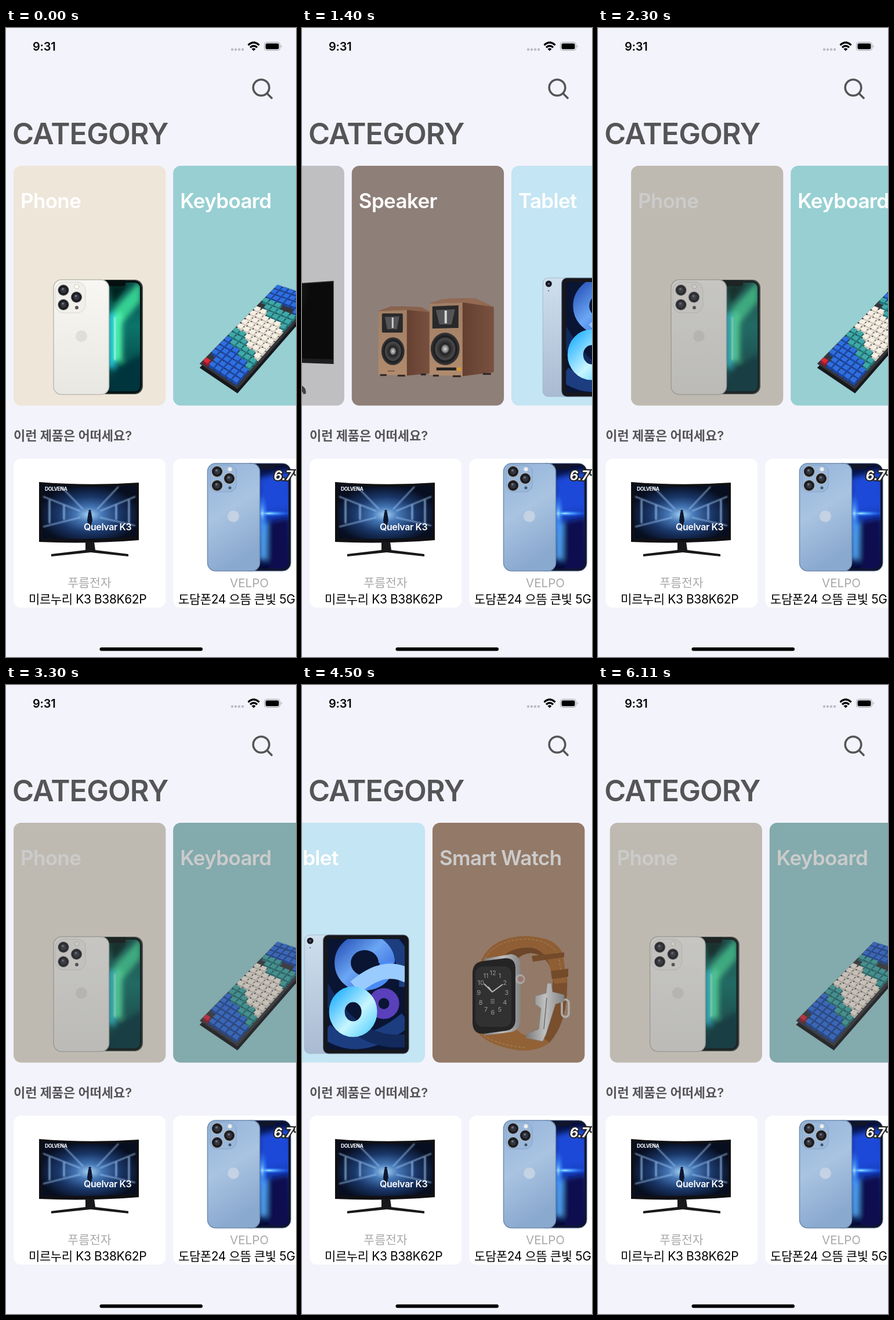
Recreate the animation shown at these times as an HTML page. Size 500x1082 px, loop 6.22 s.

```html
<!DOCTYPE html>
<html lang="ko">
<head>
<meta charset="utf-8">
<title>Category</title>
<style>
  html, body { margin: 0; height: 100%; overflow: hidden; background: #f3f3fb; }
  svg { display: block; width: 100vw; height: 100vh; }
  text { font-family: Inter, 'Noto Sans CJK KR', 'Noto Sans CJK', sans-serif; }
  .title { font-size: 35px; font-weight: 600; letter-spacing: -.65px; fill: #fff; }
  .maker { font-size: 20.5px; fill: #a9a9ab; text-anchor: middle; }
  .item { font-size: 21px; letter-spacing: -.4px; }
</style>
</head>
<body>
<svg viewBox="0 0 500 1082">
  <defs>
    <filter id="soft" x="-50%" y="-50%" width="200%" height="200%"><feGaussianBlur stdDeviation="5"/></filter>
    <filter id="haze" x="-50%" y="-50%" width="200%" height="200%"><feGaussianBlur stdDeviation="1"/></filter>
    <linearGradient id="white" x2="0" y2="1"><stop stop-color="#f8f7f3"/><stop offset="1" stop-color="#e8e7e2"/></linearGradient>
    <linearGradient id="teal" x2="0" y2="1"><stop stop-color="#0b4a48"/><stop offset=".4" stop-color="#0c746a"/><stop offset=".75" stop-color="#06504f"/><stop offset="1" stop-color="#03262e"/></linearGradient>
    <radialGradient id="gloss" cx=".1" cy=".1" r=".7"><stop stop-color="#777"/><stop offset=".35" stop-color="#3a3a3a"/><stop offset="1" stop-color="#0b0b0b"/></radialGradient>
    <linearGradient id="front" x2="0" y2="1"><stop stop-color="#a17e64"/><stop offset="1" stop-color="#b18b6d"/></linearGradient>
    <linearGradient id="side"><stop stop-color="#70493a"/><stop offset=".5" stop-color="#633f30"/><stop offset="1" stop-color="#7a5140"/></linearGradient>
    <radialGradient id="cone"><stop stop-color="#ddd"/><stop offset=".22" stop-color="#777"/><stop offset=".3" stop-color="#222"/><stop offset=".65" stop-color="#4a4a4c"/><stop offset=".75" stop-color="#1b1b1d"/><stop offset="1" stop-color="#39393c"/></radialGradient>
    <linearGradient id="back" x2="0" y2="1"><stop stop-color="#cfdfee"/><stop offset="1" stop-color="#a9bbd2"/></linearGradient>
    <linearGradient id="loop" x2="1" y2="1"><stop stop-color="#2f5cc0"/><stop offset=".45" stop-color="#6ba6f4"/><stop offset="1" stop-color="#3467dc"/></linearGradient>
    <linearGradient id="ring" x2="1" y2="1"><stop stop-color="#35b8ff"/><stop offset=".6" stop-color="#c8f6ff"/><stop offset="1" stop-color="#6fd8ff"/></linearGradient>
    <linearGradient id="steel"><stop stop-color="#888"/><stop offset=".5" stop-color="#eee"/><stop offset="1" stop-color="#999"/></linearGradient>
    <radialGradient id="hall" cx=".5" cy=".55" r=".55"><stop stop-color="#a9d4f7"/><stop offset=".25" stop-color="#4577b5"/><stop offset=".6" stop-color="#1a3769"/><stop offset="1" stop-color="#070e20"/></radialGradient>
    <linearGradient id="sky" x2=".3" y2="1"><stop stop-color="#93b4da"/><stop offset=".5" stop-color="#a9c3e1"/><stop offset="1" stop-color="#8aa9cf"/></linearGradient>
    <linearGradient id="navy" x2="0" y2="1"><stop stop-color="#050d38"/><stop offset=".45" stop-color="#1744c6"/><stop offset="1" stop-color="#050b34"/></linearGradient>
    <radialGradient id="glow"><stop stop-color="#c9f2ff"/><stop offset=".3" stop-color="#4fa5ff"/><stop offset="1" stop-color="#2a6cff" stop-opacity="0"/></radialGradient>
    <clipPath id="pane"><rect x="44" y="437" width="133" height="190" rx="3"/></clipPath>
    <clipPath id="greenPane"><rect x="140" y="438" width="91" height="187" rx="9"/></clipPath>
    <clipPath id="bluePane"><rect x="410" y="753" width="77" height="177" rx="10"/></clipPath>

    <g id="lens"><circle r="10" fill="#b4b4b2"/><circle r="9" fill="#1c1d22"/><circle r="5" fill="#34363f"/><circle cx="-1" cy="-2" r="2" fill="#6a7080"/></g>

    <g id="art0" transform="translate(-13)">
      <rect x="130" y="433" width="106" height="197" rx="14" fill="#3e4a48"/>
      <rect x="132" y="434.500" width="102" height="194" rx="13" fill="#06100f"/>
      <g clip-path="url(#greenPane)">
        <rect x="140" y="438" width="91" height="187" fill="url(#teal)"/>
        <g filter="url(#soft)">
          <path d="M176 440H212L186 476Z" fill="#04211f"/>
          <path d="M184 486L232 434V470L190 520Z" fill="#35cf92"/>
          <path d="M188 490H200V574H188Z" fill="#4ff5a6"/>
          <path d="M176 490H188V585H176Z" fill="#20c6dc"/>
          <path d="M190 585L235 560V630H176Z" fill="#04343c"/>
        </g>
        <rect x="186.500" y="497" width="2.500" height="74" fill="#a5ffd0" filter="url(#haze)"/>
      </g>
      <path d="M170 434H206V440Q206 444 202 444H170Z" fill="#06100f"/>
      <rect x="82" y="433" width="95.500" height="197.500" rx="14" fill="url(#white)" stroke="#bcbab2" stroke-width="1.500"/>
      <rect x="85" y="437" width="52" height="53" rx="14" fill="#f1f0eb" stroke="#d8d6cf"/>
      <use href="#lens" x="99" y="451"/><use href="#lens" x="121.500" y="463"/><use href="#lens" x="99" y="476"/>
      <circle cx="122" cy="445" r="4" fill="#fffdf2" stroke="#ccc"/><circle cx="122" cy="481" r="3" fill="#55555a"/>
      <circle cx="130" cy="530" r="10" fill="#dfded9"/>
    </g>

    <g id="art1"></g>

    <g id="art2" transform="translate(-151)">
      <path d="M215 613Q265 604 330 612Q349 615 347 629L343 630Q341 621 322 619Q270 613 217 618Z" fill="#414143"/>
      <path d="M295 572H311V610L303 613L295 610Z" fill="#2b2b2d"/><path d="M300 576H303V611H300Z" fill="#555"/>
      <path d="M197 449L395 435V578L197 571Z" fill="#1e1e20"/>
      <path d="M198.500 450.500L394 437V570L198.500 564Z" fill="url(#gloss)"/>
      <circle cx="285" cy="570.500" r="1.500" fill="#aaa"/>
    </g>

    <g id="art3" transform="translate(-86)">
      <path d="M132 487L154 479L205 480L222 489V594L181 598Z" fill="url(#side)"/>
      <path d="M132 487L154 479L205 480L222 489L181 485Z" fill="#8a634d"/>
      <path d="M132 487L181 485V598L132 596Z" fill="url(#front)"/>
      <rect x="138" y="491" width="36" height="33" rx="2" fill="#29292b"/><path d="M143 497L168 496L164 518H147Z" fill="#555558"/><path d="M155 498H158V516H155Z" fill="#ccc"/>
      <ellipse cx="157" cy="556" rx="20" ry="24" fill="url(#cone)"/>
      <path d="M148 590H160" stroke="#6b4b38" stroke-width="1.500"/>
      <path d="M220 474L245 466L298 465L331 480V592L277 599Z" fill="url(#side)"/>
      <path d="M220 474L245 466L298 465L331 480L277 472Z" fill="#936a54"/>
      <path d="M220 474L277 472V599L220 597Z" fill="url(#front)"/>
      <path d="M225 479L270 477V516L225 517Z" fill="#29292b"/><path d="M231 485L264 484L258 510H237Z" fill="#555558"/><path d="M246 486H250V508H246Z" fill="#d5d5d5"/>
      <ellipse cx="247" cy="552" rx="25" ry="28" fill="url(#cone)"/>
      <path d="M232 584H266V589H232Z" fill="#222"/><circle cx="271" cy="587" r="3.500" fill="#d79b2f"/>
      <path d="M135 597H146M165 598H178M205 596H214M226 598H236M260 599H274M312 595H326" stroke="#2b2220" stroke-width="3"/>
    </g>

    <g id="art4" transform="translate(50.300)">
      <rect x="4" y="430" width="60" height="204" rx="9" fill="url(#back)" stroke="#9fb1c6" stroke-width=".8"/>
      <circle cx="14" cy="440" r="5.500" fill="#15171d"/><circle cx="14" cy="440" r="2" fill="#46506a"/><circle cx="14" cy="452" r="1" fill="#555"/>
      <rect x="36.500" y="430" width="147.500" height="204" rx="9" fill="#15171c" stroke="#59657a"/>
      <g clip-path="url(#pane)" fill="none">
        <path d="M44 437H177V627H44Z" fill="#0a1533"/>
        <path d="M130 425Q185 455 180 520M40 595Q100 640 180 575" stroke="#1c3d80" stroke-width="26"/>
        <path d="M36 520Q90 620 178 612" stroke="#122a5c" stroke-width="22"/>
        <circle cx="141" cy="548" r="18" stroke="#5a40bb" stroke-width="17"/>
        <path d="M146 478A38 36 0 1 0 108 514" stroke="url(#loop)" stroke-width="28"/>
        <path d="M146 476Q146 512 105 514" stroke="#4a8bf5" stroke-width="24"/>
        <path d="M182 500Q140 478 92 520" stroke="#9acbff" stroke-width="26"/>
        <ellipse cx="88" cy="562" rx="28" ry="30" stroke="url(#ring)" stroke-width="27"/>
      </g>
    </g>

    <g id="art5" transform="translate(-225)">
      <path d="M433 500L457 504Q460 580 426 616L403 604Q430 566 433 500Z" fill="#8a4d1e"/>
      <path d="M307 478Q325 433 385 432Q440 433 450 464L457 512L435 514L427 484Q418 463 394 461Q372 464 366 480Z" fill="#a96326"/>
      <path d="M340 476Q356 450 394 452Q418 454 427 484Q418 463 394 461Q372 464 366 480Z" fill="#764018"/>
      <path d="M316 470Q334 439 385 437Q430 438 442 466L450 508" fill="none" stroke="#cf9f68" stroke-width="1" stroke-dasharray="4 3"/>
      <path d="M396 466L452 460V468L398 476ZM429 492L459 488V502L431 506Z" fill="#80481a"/>
      <path d="M300 592Q312 618 370 628Q405 632 427 615L410 603Q378 608 368 588Z" fill="#ad6829"/>
      <path d="M308 599Q330 618 385 624" fill="none" stroke="#d3a56f" stroke-width="1" stroke-dasharray="4 3"/>
      <rect x="448" y="541" width="12" height="30" rx="6" fill="none" stroke="#d5d5d5" stroke-width="3.500"/>
      <path d="M423 513H430L432 528L452 533V544L437 549L421 600L415 613L386 607L388 600L408 592L412 556L402 549V535L421 530Z" fill="url(#steel)" stroke="#8a8a8a" stroke-width=".7"/>
      <path d="M422 538L417 592" stroke="#777" stroke-width="1.500"/>
      <path d="M314 471L360 463Q376 464 377 484V576Q376 594 360 597L314 603Z" fill="url(#steel)"/>
      <circle cx="376" cy="506" r="8.500" fill="#c9c9c9"/><circle cx="377" cy="506" r="5" fill="#b9887c"/>
      <path d="M312 475L350 470Q367 469 368 486V577Q367 593 350 595L312 600Q295 600 294 582V494Q295 477 312 475Z" fill="#101011"/>
      <rect x="299" y="484" width="62" height="104" rx="13" fill="#222224"/>
      <g id="dial" font-size="11" fill="#b8b8b8" text-anchor="middle"></g>
      <path d="M314 514L328 528L346 515M328 528L321 519" stroke="#e5e5e5" stroke-width="1.800" fill="none"/>
      <path d="M325 541H332M325 544H332M325 547H332" stroke="#888" stroke-width="1.500"/>
    </g>
  </defs>

  <rect width="500" height="1082" fill="#f3f3fb"/>
  <text x="46" y="39" font-size="20" font-weight="600" letter-spacing="-.2">9:31</text>
  <g fill="#bcbcc3"><circle cx="390" cy="37" r="2.200"/><circle cx="396" cy="37" r="2.200"/><circle cx="402" cy="37" r="2.200"/><circle cx="408" cy="37" r="2.200"/></g>
  <g fill="none" stroke="#000" stroke-width="3.200"><path d="M417.500 29.500Q427 20.500 436.500 29.500M421 33.500Q427 28 433 33.500"/></g>
  <path d="M427 39.500L423.500 36Q427 33 430.500 36Z"/>
  <rect x="445.500" y="24.500" width="27" height="14" rx="4" fill="none" stroke="#a0a0a6"/><rect x="447.500" y="26.500" width="23" height="10" rx="2.500"/><path d="M474.500 29Q477 31.500 474.500 34Z" fill="#a0a0a6"/>
  <g fill="none" stroke="#555558" stroke-width="3.600" stroke-linecap="round"><circle cx="440" cy="102.500" r="13.800"/><path d="M450.500 113L458 120.500"/></g>
  <text x="11" y="200" font-size="50.500" font-weight="600" letter-spacing="-1" fill="#555558">CATEGORY</text>

  <g id="row"></g>

  <text x="13" y="709" font-size="22" font-weight="600" letter-spacing="-.1" fill="#555558">이런 제품은 어떠세요?</text>
  <rect x="13" y="741" width="262.300" height="256" rx="13" fill="#fff"/>
  <rect x="288.200" y="741" width="262.300" height="256" rx="13" fill="#fff"/>

  <path d="M57 781Q143 788 229 782V881Q143 888 57 884Z" fill="#101014"/>
  <path d="M62 786Q143 792 225 787V875Q143 881 62 878Z" fill="url(#hall)"/>
  <g stroke="#a9d2ff" opacity=".7" fill="none" filter="url(#haze)">
    <path d="M64 806L128 831M223 806L162 831M64 858L128 842M223 856L162 842M95 789L133 828M194 789L157 828" stroke-width="2"/>
    <path d="M75 812V852M100 820V846M190 820V846M212 812V852" stroke-width="3"/>
  </g>
  <path d="M142 833H147L149 847L146 859H142L140 847Z" fill="#0b1830"/><circle cx="144.500" cy="831" r="2.200" fill="#0b1830"/>
  <text x="67" y="796" font-size="8.500" font-weight="700" fill="#fff" letter-spacing="-.4">DOLVENA</text>
  <text x="134" y="864" font-size="16" font-weight="600" fill="#fff" letter-spacing="-.4">Quelvar K3</text>
  <path d="M137 884H152L154 898L211 905V909L146 902L78 909V905L137 898Z" fill="#18181b"/>
  <text class="maker" x="144" y="962">푸름전자</text>
  <text class="item" x="39" y="990">미르누리 K3 B38K62P</text>

  <rect x="405" y="749" width="86" height="185" rx="14" fill="#10152c" stroke="#536a96"/>
  <g clip-path="url(#bluePane)">
    <rect x="410" y="753" width="77" height="177" fill="url(#navy)"/>
    <g filter="url(#soft)">
      <path d="M436 775L490 760V826L440 834Z" fill="#1b49d8"/>
      <path d="M452 850L490 842V935H452Z" fill="#071050"/>
      <path d="M438 850H449V915H438Z" fill="#58b4ff"/>
    </g>
    <ellipse cx="452" cy="835" rx="40" ry="5" fill="url(#glow)"/><ellipse cx="442" cy="835" rx="10" ry="36" fill="url(#glow)" opacity=".7"/>
  </g>
  <path d="M430 750H464V755Q464 759 460 759H430Z" fill="#10152c"/>
  <rect x="347.500" y="749" width="90" height="185" rx="14" fill="url(#sky)" stroke="#6f8cb0" stroke-width="1.500"/>
  <rect x="352" y="752" width="45" height="46" rx="12" fill="#9ab8da" stroke="#83a2c8"/>
  <use href="#lens" x="364" y="763"/><use href="#lens" x="385" y="775"/><use href="#lens" x="364" y="787"/>
  <circle cx="386" cy="759" r="3.500" fill="#eee"/><circle cx="386" cy="791" r="2.500" fill="#456"/>
  <circle cx="392" cy="840" r="10" fill="#c4d2e4"/>
  <text x="461.500" y="778" font-size="23" font-weight="700" font-style="italic" letter-spacing="-.6" fill="#fff" stroke="#222" stroke-width="4" paint-order="stroke" stroke-linejoin="round">6.7"</text>
  <text class="maker" x="419.500" y="962">VELPO</text>
  <text class="item" x="297" y="990">도담폰24 으뜸 큰빛 5G</text>

  <rect x="161.500" y="1065.500" width="177.500" height="6" rx="3"/>
</svg>
<script>
const $ = id => document.getElementById(id);
const PITCH = 275.2, END = 1164, LOOP = 6220;

// name, colour, time of the touch that dims the card
const cards = [
  ['Phone', '#eee6d9', 900], ['Keyboard', '#97cfd3', 3200], ['Monitor', '#bfbfc1'],
  ['Speaker', '#8e7f78'], ['Tablet', '#c4e5f3'], ['Smart Watch', '#ae8a70', 4400]
];

// start, end, scroll from, scroll to
const moves = [
  [850, 1768, 0, END], [1768, 2300, END, -44], [2300, 2800, -44, 0],
  [3300, 4300, 0, END], [4500, 5874, END, -44], [5874, 6195, -44, 0]
];

// Keyboard plane: u runs along the rows, v across them
const mix = (a, b, k) => a + (b - a) * k;
const plane = (u, v) => [
  mix(mix(50, 180, u), mix(110, 244, u), v),
  mix(mix(572, 440, u), mix(612, 460, u), v)
];
const quad = (u0, v0, u1, v1, dy, fill) => {
  const points = [[u0, v0], [u1, v0], [u1, v1], [u0, v1]].map(([u, v]) => {
    const [x, y] = plane(u, v);
    return x.toFixed(1) + ',' + (y + dy).toFixed(1);
  });
  return `<polygon points="${points.join(' ')}" fill="${fill}"/>`;
};
const BLUE = ['#2f6fe0', '#1a46a4'], TEAL = ['#3fa9a8', '#23787c'],
      CREAM = ['#f6efe4', '#d2c9bd'], RED = ['#d9283c', '#96182a'];

function keyColor(u, v) {
  if (u < .06 && v < .15) return RED;
  const from = .43 - .2 * v, to = .7 - .12 * v;
  if (u > from && u < to) return CREAM;
  return u > from - .12 && u < to + .13 ? TEAL : BLUE;
}

function keyboard() {
  const cols = 18, rows = 6, w = 1 / cols, h = 1 / rows;
  let out = quad(-.02, -.03, 1.01, 1.06, 11, '#17181c') + quad(-.02, -.03, 1.01, 1.06, 4, '#34363b');
  for (let c = cols - 1; c >= 0; c--) {
    for (let r = 0; r < rows; r++) {
      if (c === 14 && (r === 3 || r === 4) || r === 0 && (c === 1 || c === 13)) continue;
      const u = c * w, v = r * h, [top, side] = keyColor(u, v);
      out += quad(u, v + .01, u + w * .9, v + h * .93, 4, side) +
             quad(u + .005, v + .015, u + w * .84, v + h * .88, 0, top);
    }
  }
  return out;
}

function dial() {
  let out = '';
  for (let n = 1; n <= 12; n++) {
    const a = n * Math.PI / 6;
    out += `<text x="${329 + 24 * Math.sin(a)}" y="${533 - 34 * Math.cos(a)}">${n}</text>`;
  }
  return out;
}

$('art1').innerHTML = keyboard();
$('dial').innerHTML = dial();
$('row').innerHTML = cards.map(([name, color], i) => {
  const box = 'y="237" width="262.3" height="412.5" rx="13"';
  return `<g transform="translate(${13 + PITCH * i})"><rect ${box} fill="${color}"/>
    <text class="title" x="12" y="310">${name}</text><use href="#art${i}"/>
    <rect id="dim${i}" ${box} fill="#555" opacity="0"/></g>`;
}).join('');

function scrollAt(t) {
  let x = 0;
  for (const [start, end, from, to] of moves) {
    if (t < start) break;
    const p = Math.min(1, (t - start) / (end - start));
    x = mix(from, to, p * p * (3 - 2 * p));
  }
  return x;
}

function draw(now) {
  const ms = now % LOOP;
  const t = ms >= 6110 ? 6110 : Math.min(6000, Math.floor(ms / 100) * 100);
  $('row').setAttribute('transform', `translate(${-scrollAt(t).toFixed(1)})`);
  cards.forEach(([, , touch], i) => $('dim' + i).setAttribute('opacity', t >= touch ? .3 : 0));
  requestAnimationFrame(draw);
}
draw(performance.now());
</script>
</body>
</html>
```
